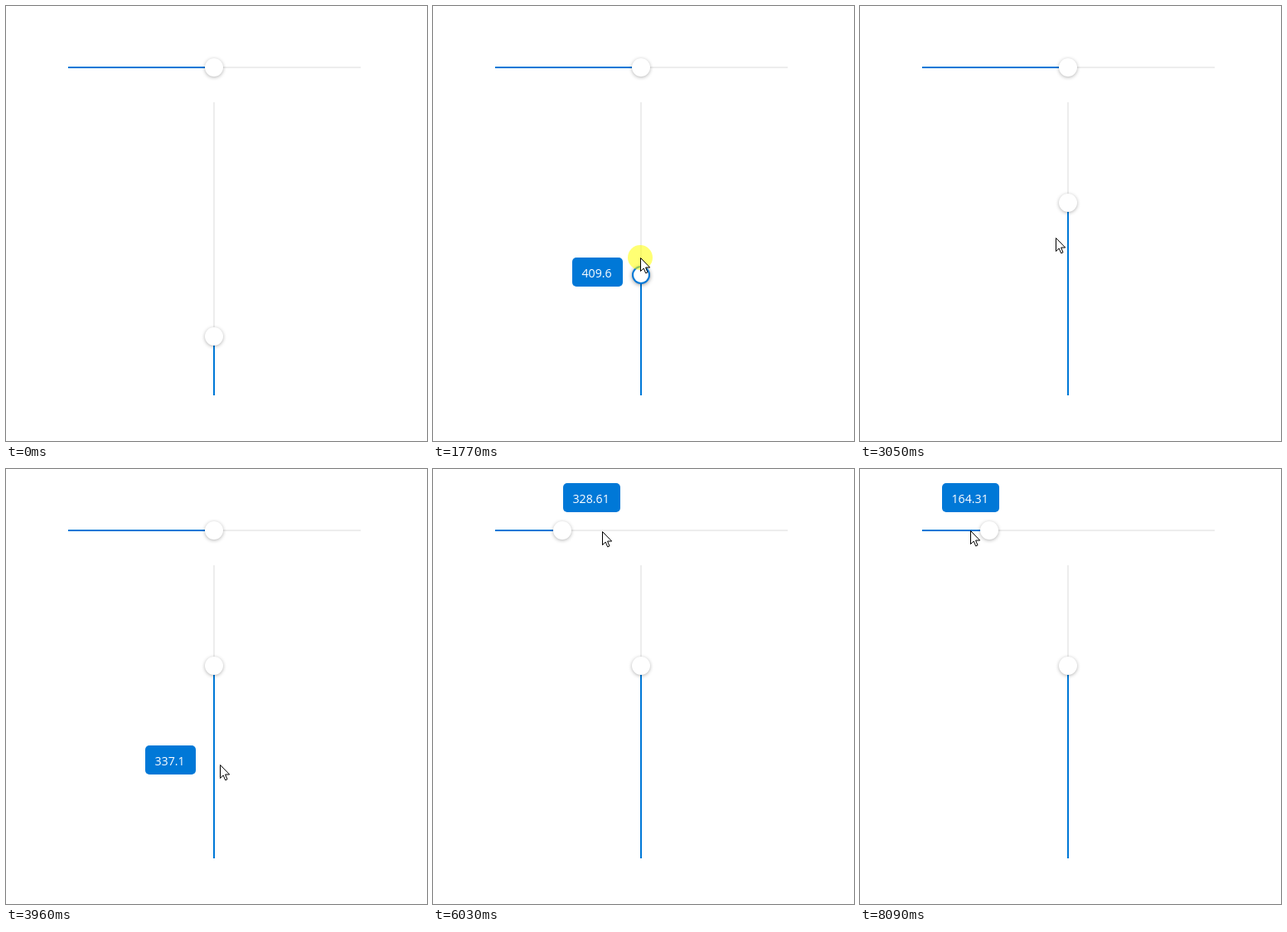
An HTML page with a canvas for the animation above (8340 ms loop, 508 by 524 pixels).

```html
<!DOCTYPE html>
<html lang="en">
<head>
<meta charset="utf-8">
<title>Sliders</title>
<style>
  html, body { margin: 0; width: 100%; height: 100%; overflow: hidden; background: #fff; }
  canvas { display: block; }
</style>
</head>
<body>
<canvas id="stage" width="508" height="524"></canvas>
<script>
const ctx = document.getElementById('stage').getContext('2d');
const BLUE = '#0078d7', GREY = '#ededed';
const LOOP = 8340, LAG = 55, ENTER = 240;
const LENGTH = 353, LEFT = 75, BOTTOM = 469, TRACK_X = 251, TRACK_Y = 74;
const DRAG_V = [1320, 2620], DRAG_H = [5190, 5700];

// Key points of the pointer path: time, x, y
const path = [
  [ENTER, 386, 474], [950, 259, 394],                                    // to the lower knob
  [1320, 259, 394], [2095, 242, 224], [2330, 239, 201], [2620, 238, 233], // drag it
  [3050, 236, 279], [3905, 257, 350], [4020, 260, 360],                  // hover down the track
  [4330, 276, 250], [4675, 260, 76], [4880, 251, 82],                    // to the upper knob
  [5190, 251, 82], [5700, 156, 76],                                      // drag it
  [6570, 304, 73], [6805, 255, 68], [6860, 226, 67], [7640, 105, 68], [8020, 133, 74]
];

const clamp = (v, [lo, hi]) => Math.min(hi, Math.max(lo, v));
const within = (v, [lo, hi]) => v >= lo && v < hi;

// Monotone cubic interpolation: turning points and rests get a zero slope
const slope = (i, k) => (path[i + 1][k] - path[i][k]) / (path[i + 1][0] - path[i][0]);
function tangent(i, k) {
  if (i === 0 || i === path.length - 1) return 0;
  const a = slope(i - 1, k), b = slope(i, k);
  return a * b <= 0 ? 0 : 2 * a * b / (a + b);
}
function pointer(time) {
  const t = clamp(time, [path[0][0], path[path.length - 1][0]]);
  const i = Math.max(0, path.findIndex(p => p[0] >= t) - 1);
  const span = path[i + 1][0] - path[i][0], u = (t - path[i][0]) / span;
  const ease = u * u * (3 - 2 * u);
  const at = k => Math.round(path[i][k] + (path[i + 1][k] - path[i][k]) * ease
    + span * u * (1 - u) * ((1 - u) * tangent(i, k) - u * tangent(i + 1, k)));
  return { x: at(1), y: at(2) };
}

function rect(x, y, w, h, color) {
  ctx.fillStyle = color;
  ctx.fillRect(x, y, w, h);
}

function disc(x, y, r, color) {
  ctx.fillStyle = color;
  ctx.beginPath();
  ctx.arc(x, y, r, 0, 2 * Math.PI);
  ctx.fill();
}

function knob(x, y, hovered, pressed) {
  ctx.save();
  ctx.shadowColor = `rgba(0,0,0,${hovered ? 0.4 : 0.3})`;
  ctx.shadowBlur = hovered ? 5 : 4;
  ctx.shadowOffsetY = 1;
  disc(x, y, 11, pressed ? BLUE : '#fff');
  ctx.restore();
  if (pressed) disc(x, y, 9, '#fff');
}

function tooltip(value, top, leftFor) {
  const text = String(value);
  ctx.font = '500 14.2px "Open Sans", "Noto Sans", sans-serif';
  const width = Math.round(ctx.measureText(text).width + 24.6);
  const left = leftFor(width);
  ctx.fillStyle = BLUE;
  ctx.beginPath();
  ctx.roundRect(left, top, width, 35, 5);
  ctx.fill();
  ctx.fillStyle = '#fff';
  ctx.fillText(text, left + 11.5, top + 24);
}

const arrowShape = new Path2D('M0 0V16L3.7 12.5L6.2 18.3L8.5 17.3L6.1 11.5H11.2Z');
function arrow(x, y) {
  ctx.save();
  ctx.translate(x + 0.5, y + 0.5);
  ctx.lineJoin = 'round';
  ctx.fillStyle = '#fff';
  ctx.strokeStyle = '#000';
  ctx.fill(arrowShape);
  ctx.stroke(arrowShape);
  ctx.restore();
}

function draw(now) {
  const t = now % LOOP, seen = t - LAG;
  // The sliders react to the pointer slightly late
  const tip = pointer(t), felt = pointer(seen);
  const shown = t >= ENTER;
  const draggingV = within(seen, DRAG_V), draggingH = within(seen, DRAG_H);
  const knobX = pointer(clamp(seen, DRAG_H)).x;
  const knobY = pointer(clamp(seen, DRAG_V)).y + 4;
  const near = (x, y) => shown && Math.hypot(felt.x - x, felt.y - y) <= 12;

  rect(0, 0, 508, 524, '#fff');
  rect(LEFT, TRACK_Y - 1, LENGTH, 2, GREY);
  rect(LEFT, TRACK_Y - 1, knobX - LEFT, 2, BLUE);
  rect(TRACK_X - 1, BOTTOM - LENGTH, 2, LENGTH, GREY);
  rect(TRACK_X - 1, knobY, 2, BOTTOM - knobY, BLUE);
  knob(knobX, TRACK_Y, near(knobX, TRACK_Y), draggingH);
  knob(TRACK_X, knobY, near(TRACK_X, knobY), draggingV);

  const overV = Math.abs(felt.x - TRACK_X) <= 11 && within(felt.y, [BOTTOM - LENGTH, BOTTOM]);
  const overH = Math.abs(felt.y - TRACK_Y) <= 11 && within(felt.x, [LEFT, LEFT + LENGTH]);
  if (draggingV || overV) {
    const value = (BOTTOM - felt.y - (draggingV ? 4.4 : 0)) / LENGTH * 1000;
    tooltip(+value.toFixed(1), felt.y - 17, w => 229 - w);
  } else if (draggingH || overH) {
    const value = (felt.x - LEFT) / LENGTH * 1000;
    tooltip(+value.toFixed(2), 17, w => Math.round(felt.x + 0.4 - w / 2));
  }

  if (within(t, DRAG_V) || within(t, DRAG_H)) disc(tip.x, tip.y, 15, 'rgba(255,255,0,0.55)');
  if (shown) arrow(tip.x, tip.y);
  requestAnimationFrame(draw);
}
requestAnimationFrame(draw);
</script>
</body>
</html>
```
